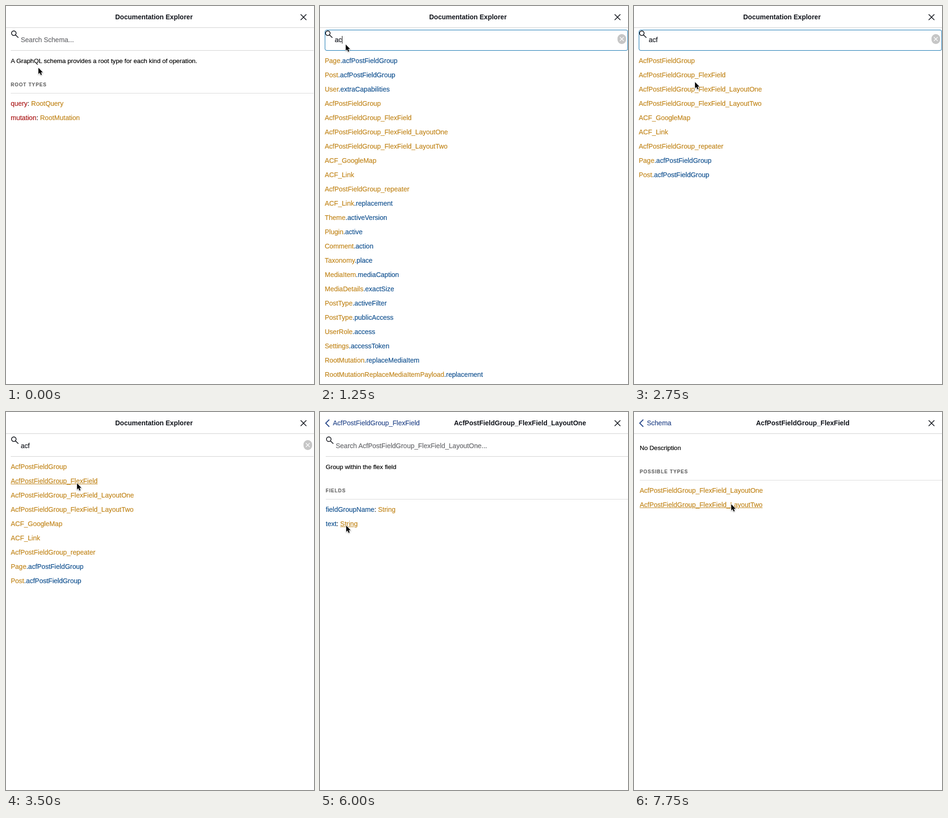
Write an HTML page that moves like this. It is 646 px wide and 795 px high and loops after 8 s.

```html
<!DOCTYPE html>
<html lang="en">
<head>
<meta charset="utf-8">
<title>Documentation Explorer</title>
<style>
html, body { margin: 0; width: 100%; height: 100%; overflow: hidden; background: #fff; }
#stage { position: relative; width: 646px; height: 795px; overflow: hidden;
  font: 14px/20px "Liberation Sans", Arial, sans-serif; color: #10131a;
  -webkit-text-stroke: 0.2px; }
#stage div, #stage svg { position: absolute; white-space: pre; }
#view { inset: 0; }
i { font-style: normal; }
.title { font-weight: bold; -webkit-text-stroke: 0; }
.desc { font-size: 13.2px; line-height: 21px; color: #000; }
.cat { font-size: 10px; line-height: 21px; font-weight: bold; letter-spacing: 1.1px; color: #666; }
.hint { color: #66676b; }
.type { color: #c1851a; }
.field { color: #10508f; }
.key { color: #a91414; }
.back { color: #27478a; }
.hover { text-decoration: underline; }
.line { height: 1px; background: #d0d0d0; }
.light { background: #dadada; }
.focus { box-sizing: border-box; height: 44px; border: 1px solid #0a6fae; border-radius: 4px; }
.caret { width: 1px; height: 16px; background: #000; display: inline-block; vertical-align: -3px; }
.clear { width: 18px; height: 21px; border-radius: 9px; background: #c6c6c6; }
</style>
</head>
<body>
<div id="stage">
  <div id="view"></div>
  <svg id="cursor" width="20" height="26" viewBox="-4 -4 20 26" style="filter:drop-shadow(0 1px 1px #0005)">
    <path d="M0 0V13L2.9 10.3L5 15.2L7.2 14.2L5.2 9.4H9.2Z" stroke="#fff" stroke-width="1.6" paint-order="stroke"/>
  </svg>
</div>
<script>
const view = document.getElementById('view'), cursor = document.getElementById('cursor');

const text = (x, y, html, cls = '') =>
  `<div class="${cls}" style="left:${x}px;top:${y - 10}px">${html}</div>`;
const span = (cls, s, on) => `<i class="${cls}${on ? ' hover' : ''}">${s}</i>`;
const line = (x, y, w = 635, cls = '') =>
  `<div class="line ${cls}" style="left:${x}px;top:${y}px;width:${w}px"></div>`;
const stroke = (d, color, width) =>
  `<svg width="646" height="100" style="left:0;top:0" fill="none" stroke="${color}" stroke-width="${width}"><path d="${d}"/></svg>`;

const header = (x, title, back) => text(x, 23, title, 'title') + line(0, 45, 646) +
  stroke('M618 17.5L630 29.5M630 17.5L618 29.5', '#10131a', 1.7) +
  (back ? stroke('M19.5 16L12 23.5L19.5 31', '#27478a', 2) + text(27, 23, back, 'back') : '');

const category = (x, y, name) => text(x, y, name, 'cat') + line(x, y + 18, 635, 'light');

function search(x, hint, value = '', focus, caret) {
  const bar = caret ? '<i class="caret"></i>' : '';
  return (focus ? `<div class="focus" style="left:${x}px;top:50px;width:${646 - x}px"></div>` : line(x, 93)) +
    stroke(`M${x + 11.2} 57.2a4.8 4.8 0 1 0-9.6 0a4.8 4.8 0 1 0 9.6 0M${x + 9.8} 60.6L${x + 16} 66.8`, '#10131a', 1.6) +
    text(x + 21, 71, value ? value + bar : bar + span('hint', hint)) +
    (value ? '<div class="clear" style="left:624px;top:59px"></div>' +
      stroke('M629 65.5L637 73.5M637 65.5L629 73.5', '#fff', 1.3) : '');
}

const rows = (x, y, list, hover) => list.map((name, i) => {
  const [type, field] = name.split('.');
  return text(x, y + 30 * i, span('type', type, i === hover) + (field ? span('field', '.' + field) : ''));
}).join('');

const group = 'AcfPostFieldGroup', flex = group + '_FlexField';
const layouts = [flex + '_LayoutOne', flex + '_LayoutTwo'];
const acfRows = [group, flex, ...layouts, 'ACF_GoogleMap', 'ACF_Link', group + '_repeater',
  'Page.acfPostFieldGroup', 'Post.acfPostFieldGroup'];
const acRows = ['Page.acfPostFieldGroup', 'Post.acfPostFieldGroup', 'User.extraCapabilities',
  ...acfRows.slice(0, 7), 'ACF_Link.replacement', 'Theme.activeVersion', 'Plugin.active',
  'Comment.action', 'Taxonomy.place', 'MediaItem.mediaCaption', 'MediaDetails.exactSize',
  'PostType.activeFilter', 'PostType.publicAccess', 'UserRole.access', 'Settings.accessToken',
  'RootMutation.replaceMediaItem', 'RootMutationReplaceMediaItemPayload.replacement'];

const explorer = header(229, 'Documentation Explorer');
const pages = {
  root: (value, focus, caret) => explorer + search(10, 'Search Schema...', value, focus, caret) +
    text(10, 115, 'A GraphQL schema provides a root type for each kind of operation.', 'desc') +
    category(10, 165, 'ROOT TYPES') +
    text(10, 205, span('key', 'query') + ': ' + span('type', 'RootQuery')) +
    text(10, 235, span('key', 'mutation') + ': ' + span('type', 'RootMutation')),
  wide: () => explorer + search(10, '', 'ac', true, true) + rows(10, 115, acRows),
  found: (focus, caret, hover) => explorer + search(10, '', 'acf', focus, caret) + rows(10, 115, acfRows, hover),
  flex: hover => header(256, flex, 'Schema') + text(12, 75, 'No Description', 'desc') +
    category(12, 125, 'POSSIBLE TYPES') + rows(12, 165, layouts, hover),
  layout: hover => header(281, layouts[0], flex) + search(12, `Search ${layouts[0]}...`) +
    text(12, 115, 'Group within the flex field', 'desc') + category(12, 165, 'FIELDS') +
    text(12, 205, span('field', 'fieldGroupName') + ': ' + span('type', 'String')) +
    text(12, 235, span('field', 'text') + ': ' + span('type', 'String', hover)),
};

// start time, pointer x, pointer y, page, page arguments
const steps = [
  [0, 68, 130, 'root'],
  [250, 58, 98, 'root'],
  [500, 54, 81, 'root', '', true, true],
  [750, 54, 81, 'root', 'a', true, true],
  [1000, 54, 81, 'root', 'ac', true, true],
  [1250, 54, 81, 'wide'],
  [1500, 54, 81, 'found', true, true],
  [1750, 54, 81, 'found', true, false],
  [2250, 58, 92, 'found', true, true],
  [2500, 88, 129, 'found', true, true],
  [2750, 128, 160, 'found', true, false],
  [3000, 146, 152, 'found', true, false, 1],
  [3250, 149, 150, 'found', true, true, 1],
  [3500, 149, 150, 'found', false, false, 1],
  [3750, 149, 150, 'flex'],
  [4250, 222, 173, 'flex', 0],
  [4500, 241, 172, 'flex', 0],
  [5000, 241, 172, 'layout'],
  [5500, 190, 212, 'layout'],
  [5750, 88, 236, 'layout'],
  [6000, 55, 239, 'layout', true],
  [6250, 47, 178, 'layout'],
  [6500, 38, 112, 'layout'],
  [6750, 36, 26, 'layout'],
  [7000, 36, 26, 'flex'],
  [7250, 92, 88, 'flex'],
  [7500, 176, 168, 'flex', 0],
  [7750, 204, 194, 'flex', 1],
];

let shown, start;
function frame(now) {
  start ??= now;
  const t = (now - start) % 8000;
  const step = steps.findLast(s => s[0] <= t);
  if (step !== shown) {
    shown = step;
    const [, x, y, page, ...args] = step;
    view.innerHTML = pages[page](...args);
    cursor.style.left = x - 4 + 'px';
    cursor.style.top = y - 4 + 'px';
  }
  requestAnimationFrame(frame);
}
requestAnimationFrame(frame);
</script>
</body>
</html>
```
